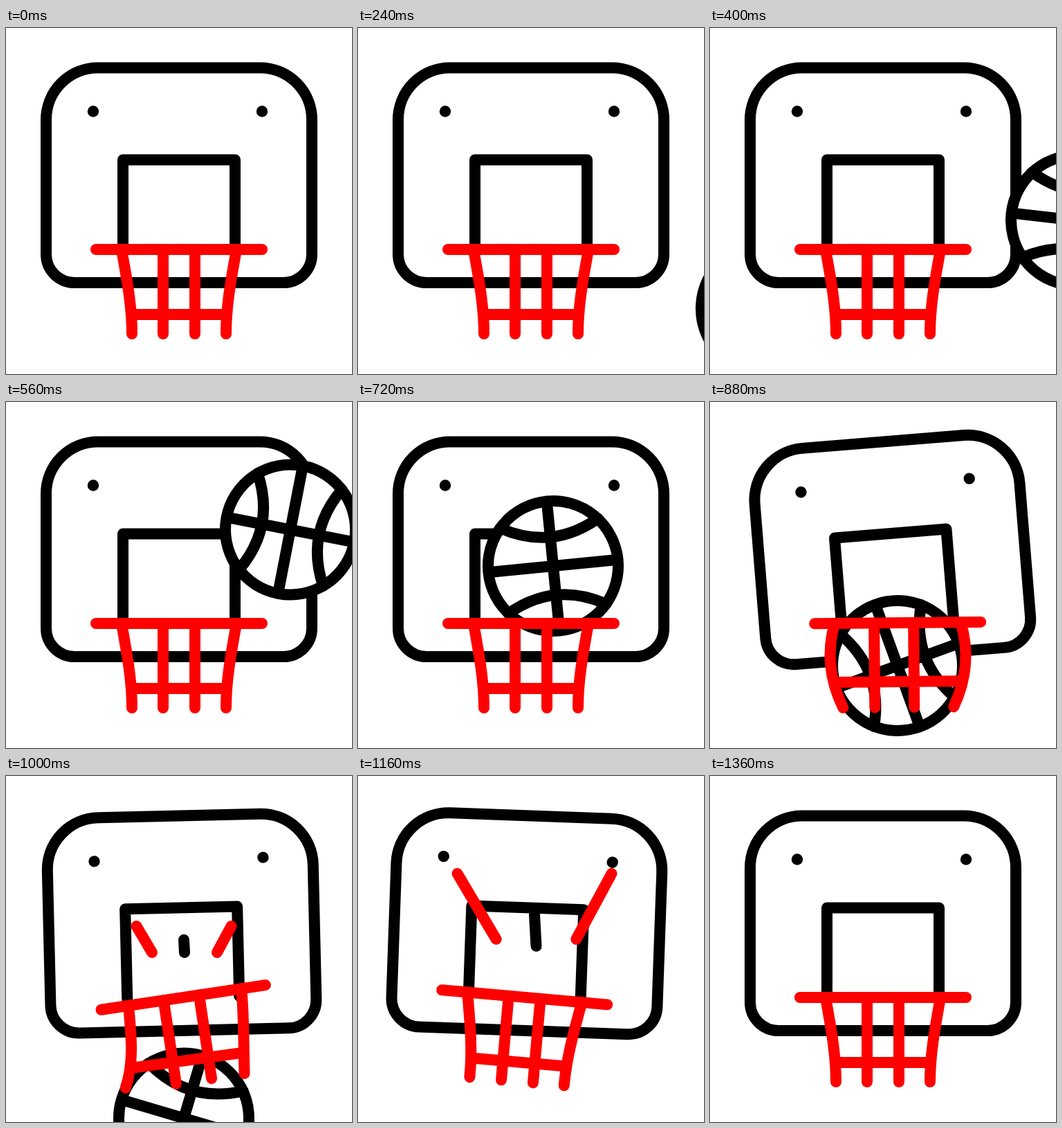
An HTML page that plays this animation: 500x500 px, repeating every 2000 ms.

```html
<!DOCTYPE html>
<html lang="en">
<head>
<meta charset="utf-8">
<title>Basketball hoop</title>
<style>
  html, body { margin: 0; width: 100%; height: 100%; overflow: hidden; background: #fff; }
  svg { display: block; width: 100vw; height: 100vh; }
  g, path { fill: none; stroke-width: 16; stroke-linecap: round; stroke-linejoin: round; }
  .ink { stroke: #000; }
  .red { stroke: #f00; }
  .bolt { fill: #000; stroke: none; }
</style>
</head>
<body>
<svg viewBox="0 0 500 500">
  <g id="board" class="ink">
    <path d="M133 57.5H367A75 75 0 0 1 442 132.5V327A41 41 0 0 1 401 368H99A41 41 0 0 1 58 327V132.5A75 75 0 0 1 133 57.5Z"/>
    <path d="M169 320V190.5H331V320"/>
    <circle class="bolt" cx="126" cy="120.5" r="8.2"/>
    <circle class="bolt" cx="370" cy="120.5" r="8.2"/>
  </g>
  <path class="ray red"/>
  <path class="ray ink"/>
  <path class="ray red"/>
  <g id="ball" class="ink">
    <circle r="94" fill="#fff"/>
    <path d="M-92 0H92M0 -92V92M-62 -71Q-22 0 -62 71M62 -71Q22 0 62 71"/>
  </g>
  <g id="hoop" class="red">
    <path d="M-120 0H120"/>
    <path id="net"/>
  </g>
</svg>
<script>
const LOOP = 2000, STEP = 40;
const $ = id => document.getElementById(id);
const rays = document.querySelectorAll('.ray');
const clamp = v => Math.min(1, Math.max(0, v));
const mix = (a, b, p) => a + (b - a) * p;
const ramp = (t, from, to) => clamp((t - from) / (to - from));
const ease = p => (1 - Math.cos(Math.PI * p)) / 2;
const poly = (u, ...c) => c.reduceRight((sum, k) => sum * u + k, 0);

// Rises from 0 to 1 at the peak, then falls back to 0.
const bump = (t, start, peak, end) =>
  ease(t < peak ? ramp(t, start, peak) : 1 - ramp(t, peak, end));

const boardAngle = t =>
  -5.4 * bump(t, 760, 920, 1080) + 2.7 * bump(t, 920, 1080, 1320);
const hoopAngle = t =>
  6 * bump(t, 720, 840, 1000) - 7.2 * bump(t, 840, 1000, 1160) + 3 * bump(t, 1000, 1160, 1320);

// A curved throw up to the rim, then a drop through the net.
function ballPose(t) {
  const u = (t - 560) / 160, v = u - 1;
  return v < 0
    ? [poly(u, 411, -131.2, -5.5, 7.7), poly(u, 184.5, -39.2, 73, 18.7), poly(u, 11, -96, -10.5)]
    : [poly(v, 282, -6.6, -4.4), poly(v, 237, 139.8, 4.2), poly(v, -95.6, -123.3, 18.9)];
}

// The ball widens the net; the left side flicks out as it leaves.
function netPath(t) {
  const wide = bump(t, 720, 880, 1060), flick = bump(t, 880, 1000, 1180);
  const barY = 94 - 9 * wide;
  const strand = (side, f) => {
    const x = (rest, give, kick) => side * (rest + give * wide + kick * f);
    return `M${x(83, 8, -5)} 0C${x(76, 27, 0)} 40 ${x(68, 32, 7)} 80 ${x(68, 12, 31)} ${122 - 5 * f}`;
  };
  const left = 68 + 18 * wide + 17 * flick, right = 68 + 18 * wide;
  return strand(-1, flick) + strand(1, 0)
    + `M${-23 - 11 * wide - 3 * flick} 0v122M23 0V122`
    + `M${-left} ${barY - 2 * flick}L${right} ${barY}`;
}

function drawRays(t) {
  const head = 1 - (1 - ramp(t, 960, 1180)) ** 2;
  const tail = ramp(t, 1120, 1360);
  rays.forEach((ray, i) => {
    const side = i - 1;
    const at = p => `${mix(258 + 47 * side, 255 + 112 * side, p)} ${mix(255, 200 - 60 * Math.abs(side), p)}`;
    ray.setAttribute('d', head > tail ? `M${at(tail)}L${at(head)}` : '');
  });
}

function draw(t) {
  const swing = `rotate(${boardAngle(t)} 250 57)`;
  $('board').setAttribute('transform', swing);
  $('hoop').setAttribute('transform', `${swing} translate(250 320) rotate(${hoopAngle(t)})`);
  $('net').setAttribute('d', netPath(t));

  const [x, y, angle] = ballPose(t);
  $('ball').setAttribute('transform', `translate(${x} ${y}) rotate(${angle})`);
  $('ball').setAttribute('visibility', t >= 240 && t < 1160 ? 'visible' : 'hidden');
  drawRays(t);
}

const start = performance.now();
function tick() {
  const t = (performance.now() - start) % LOOP;
  draw(Math.floor(t / STEP) * STEP);
  requestAnimationFrame(tick);
}
tick();
</script>
</body>
</html>
```
